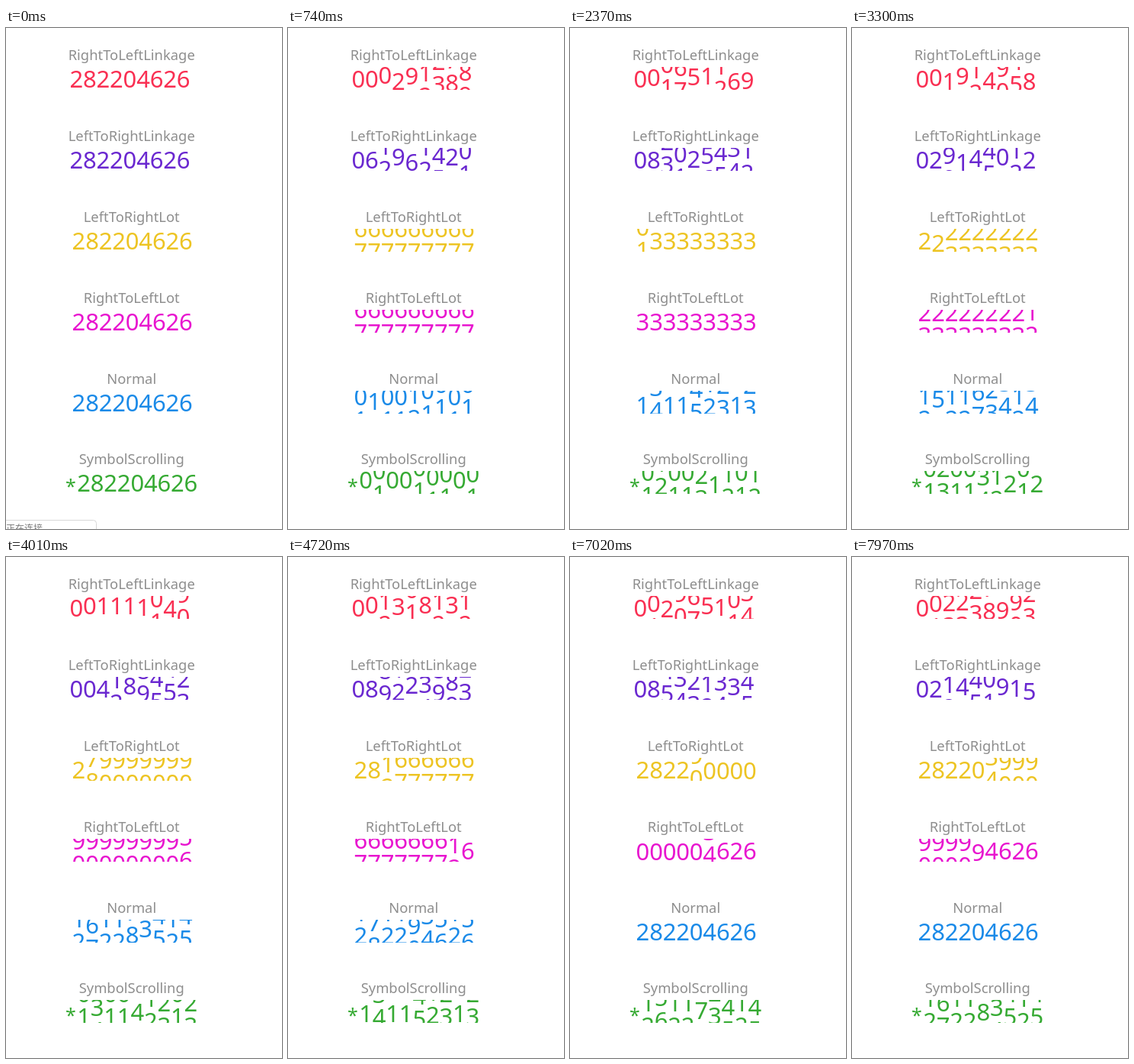
Animation of 362 by 656 pixels, one loop 8 s. Source, as an HTML page with a canvas:

```html
<!DOCTYPE html>
<html lang="en">
<head>
<meta charset="utf-8">
<title>Scrolling numbers</title>
<style>
html, body { margin: 0; width: 100%; height: 100%; overflow: hidden; background: #fff; }
canvas { display: block; width: 362px; height: 656px; }
</style>
</head>
<body>
<canvas id="stage" width="362" height="656"></canvas>
<script>
const ctx = document.getElementById('stage').getContext('2d');
const FONT = '"Noto Sans", "Open Sans", sans-serif';
const TARGET = [...'282204626'].map(Number);
const LOOP = 8000, START = 130, STEP = 77.6;
const CELL = 30, PITCH = 17.55, ROW_STEP = 105.88;

// Milliseconds since the counters began, held between steps; null while at rest.
function clock(t) {
  if (t < START) return null;
  return 57 + Math.floor((t - START + 20) / STEP) * STEP;
}

// A zero is reached by a full turn of the wheel.
const goal = col => TARGET[col] || 10;

// Each wheel turns ten times as fast as the one to its left.
function linkFromRight(col, ms) {
  return ms * 282.204626 / 10 ** (8 - col);
}

// Mirrored linkage; its second and third slowest wheels trade places.
function linkFromLeft(col, ms) {
  const power = col === 8 || col < 6 ? 8 - col : col - 5;
  return ms * 0.000622 * 10 ** power;
}

// Columns spin together, then settle one after another, a second each.
function lot(order, firstStop) {
  return (col, ms) => {
    const settled = (ms - firstStop) / 1000 - order(col);
    return settled < 0
      ? Math.max(0, ms * 0.01009 - 0.28)
      : goal(col) * Math.min(1, settled);
  };
}

function together(duration) {
  return (col, ms) => goal(col) * Math.min(1, ms / duration);
}

const ROWS = [
  { title: 'RightToLeftLinkage', color: '#f92f52', x: 83.5, value: linkFromRight },
  { title: 'LeftToRightLinkage', color: '#6a28d0', x: 83.5, value: linkFromLeft },
  { title: 'LeftToRightLot', color: '#edc423', x: 86.7, value: lot(col => col, 2000) },
  { title: 'RightToLeftLot', color: '#e815cf', x: 86.7, value: lot(col => 8 - col, 3000) },
  { title: 'Normal', color: '#1a8ae8', x: 86.7, value: together(5000) },
  { title: 'SymbolScrolling', color: '#36aa33', x: 93.3, value: together(9850), symbol: '*' }
];

function text(str, x, y, size, color) {
  ctx.font = `${size}px ${FONT}`;
  ctx.fillStyle = color;
  ctx.fillText(str, x, y);
}

function drawWheel(value, x, base, color) {
  const whole = Math.floor(value), part = value - whole;
  text(whole % 10, x, base - part * CELL, 31, color);
  text((whole + 1) % 10, x, base + (1 - part) * CELL, 31, color);
}

function drawRow(row, index, ms) {
  const shift = Math.round(index * ROW_STEP);
  const base = 78.3 + shift;
  ctx.textAlign = 'center';
  text(row.title, 164.7, 42 + shift, 18.4, '#8e8e8e');
  if (row.symbol) text(row.symbol, 85, base + 2, 25, row.color);

  ctx.save();
  ctx.beginPath();
  ctx.rect(0, 51 + shift, 362, CELL);
  ctx.clip();
  TARGET.forEach((digit, col) => {
    const value = ms === null ? digit : row.value(col, ms);
    drawWheel(value, row.x + (col + 0.5) * PITCH, base, row.color);
  });
  ctx.restore();
}

function drawStatus() {
  ctx.beginPath();
  ctx.roundRect(-10, 644.5, 128.5, 30, 4);
  ctx.strokeStyle = '#d8d8d8';
  ctx.stroke();
  ctx.textAlign = 'left';
  ctx.font = '12px "Noto Sans CJK SC", "Noto Sans CJK", sans-serif';
  ctx.fillStyle = '#777';
  ctx.fillText('正在连接...', 0, 660);
}

function draw(t) {
  const ms = clock(t);
  ctx.fillStyle = '#fff';
  ctx.fillRect(0, 0, 362, 656);
  ROWS.forEach((row, i) => drawRow(row, i, ms));
  if (ms === null) drawStatus();
}

const begin = performance.now();
function frame() {
  draw((performance.now() - begin) % LOOP);
  requestAnimationFrame(frame);
}
frame();
</script>
</body>
</html>
```
